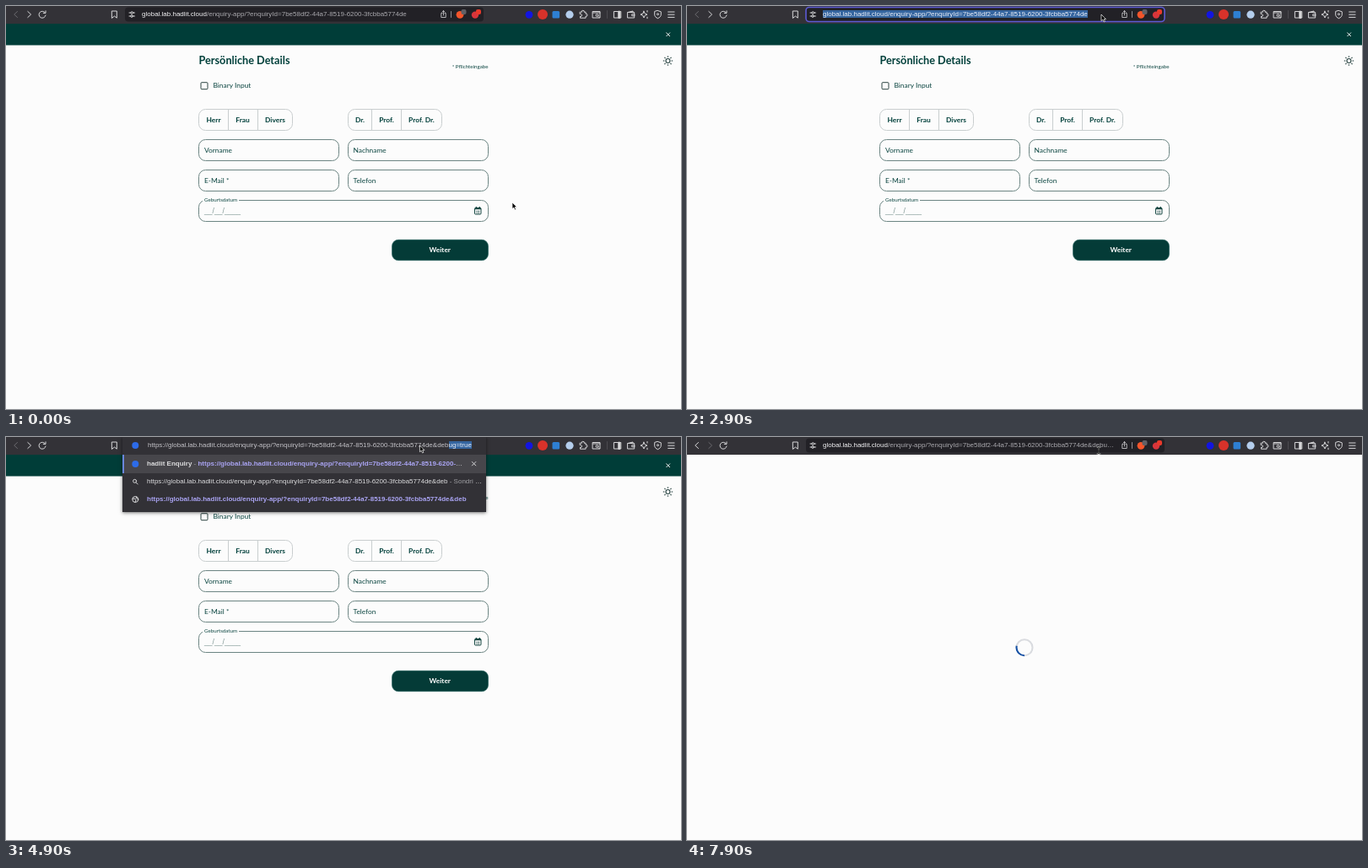
An HTML page for the animation above (8 s loop, 800 by 478 pixels).

```html
<!DOCTYPE html>
<html lang="de">
<head>
<meta charset="utf-8">
<title>Formular</title>
<style>
  html, body { margin: 0; width: 100%; height: 100%; overflow: hidden; background: #fcfcfc; }
  svg { position: absolute; left: 0; top: 0; }
  svg text { font-family: Lato, sans-serif; font-size: 8.4px; fill: #0b4540; }
  svg .bold { font-weight: 700; fill: #003f3a; }
  svg .small { font-size: 6.2px; }
  .line { fill: none; stroke-width: 1; }
  .icon { fill: none; stroke: #d6d6d8; stroke-width: 1; stroke-linecap: round; stroke-linejoin: round; }
  .row { position: absolute; height: 12px; line-height: 12px; font-family: "Liberation Sans", Arial, sans-serif;
         font-size: 8px; color: #a9a8ad; white-space: pre; overflow: hidden; text-overflow: ellipsis; }
  .row i { font-style: normal; color: #f2f2f4; }
  .row mark { background: #35659f; color: #e9eef8; }
  .row mark i { color: inherit; }
  #address { top: 4px; width: 345px; }
  #suggest { position: absolute; left: 138px; top: 0; width: 431px; height: 88.5px; background: #323136;
             box-shadow: 0 1px 4px #0008; }
  #suggest .row { left: 29px; color: #dcdcde; }
  #suggest .link { color: #aaa4f3; font-weight: 700; }
  #suggest .muted { color: #a0a0a4; }
  #active { position: absolute; top: 21px; width: 431px; height: 22px; background: #47464b; }
  #active::before { content: ""; position: absolute; width: 2px; height: 22px; background: #6a86dd; }
</style>
</head>
<body>
<svg width="800" height="478" viewBox="0 0 800 478">
  <rect width="800" height="478" fill="#fcfcfc"/>

  <g id="form">
    <rect y="20" width="800" height="26.5" fill="#003d38"/>
    <path d="M782.5 31.5l4.5 4.5m0-4.5l-4.5 4.5" stroke="#e6efee" stroke-width="1"/>
    <g stroke="#24403e" fill="none" stroke-width="1.1">
      <circle cx="784.5" cy="65" r="2.5"/>
      <g id="rays"></g>
    </g>
    <text class="bold" x="228.5" y="69.3" style="font-size:12.7px">Persönliche Details</text>
    <text class="small" x="571.5" y="74.2" text-anchor="end">* Pflichteingabe</text>
    <rect id="box" class="line" x="231" y="90.7" width="8" height="8" rx="1" stroke="#2d4442"/>
    <text x="245.5" y="97.3">Binary Input</text>

    <g class="line" stroke="#c9cecf">
      <rect x="228.5" y="122.5" width="111" height="25" rx="8"/>
      <rect x="405.5" y="122.5" width="111" height="25" rx="8"/>
      <path d="M263.5 122.5v25m35-25v25m135-25v25m35-25v25"/>
    </g>
    <g class="line" stroke="#6c8583">
      <rect x="228.5" y="158.5" width="166" height="25" rx="8"/>
      <rect x="405.5" y="158.5" width="166" height="25" rx="8"/>
      <rect x="228.5" y="194.5" width="166" height="25" rx="8"/>
      <rect x="405.5" y="194.5" width="166" height="25" rx="8"/>
      <rect x="228.5" y="230.5" width="343" height="25" rx="8"/>
    </g>
    <rect x="233" y="229" width="43" height="3" fill="#fcfcfc"/>
    <g class="choices" text-anchor="middle">
      <text class="bold" x="246" y="137.7">Herr</text>
      <text class="bold" x="280.5" y="137.7">Frau</text>
      <text class="bold" x="319" y="137.7">Divers</text>
      <text class="bold" x="419.5" y="137.7">Dr.</text>
      <text class="bold" x="451" y="137.7">Prof.</text>
      <text class="bold" x="492.5" y="137.7">Prof. Dr.</text>
    </g>
    <text x="235" y="173.6">Vorname</text>
    <text x="411.5" y="173.6">Nachname</text>
    <text x="235" y="209.6">E-Mail *</text>
    <text x="411.5" y="209.6">Telefon</text>
    <text class="small" x="235" y="232.4">Geburtsdatum</text>
    <text x="235" y="245.7" style="font:8.6px 'Liberation Sans',sans-serif;fill:#7d9593">__/__/____</text>
    <rect class="line" x="555.5" y="239.5" width="7.5" height="7.5" rx="1" stroke="#164742"/>
    <path d="M555.5 240.5h7.5M557.3 238v2m4-2v2" stroke="#164742" stroke-width="1.3"/>
    <path d="M557.3 243.3h4M557.3 245.2h4" stroke="#164742" stroke-dasharray="1 .5"/>
    <rect x="457.5" y="277.3" width="114" height="24.4" rx="7.5" fill="#043b37" stroke="#1c5d58" stroke-width=".6"/>
    <text class="bold" x="514.2" y="292.2" text-anchor="middle" style="fill:#fff">Weiter</text>
  </g>

  <g id="spinner" fill="none" stroke-width="2">
    <circle cx="400" cy="249.7" r="9.5" stroke="#d9dbdf"/>
    <circle id="arc" cx="400" cy="249.7" r="9.5" stroke="#1450a5" pathLength="360" stroke-dasharray="102 258"/>
  </g>

  <rect width="800" height="21" fill="#333237"/>
  <g class="icon">
    <path id="back" d="M13.5 6.5L9.7 10l3.8 3.5"/>
    <path id="forward" d="M25.8 6.5L29.6 10l-3.8 3.5"/>
    <path id="reload" d="M46.4 8a4 4 0 1 0 .6 3M47 5.8v2.6h-2.7"/>
    <path id="stop" d="M40.7 7.5l5 5m0-5l-5 5"/>
    <path d="M125.7 6h5.6v8.2l-2.8-2.2-2.8 2.2z"/>
  </g>
  <rect id="pill" x="141" y="1.5" width="425" height="17" rx="4" fill="#222126" stroke-width="1.6"/>
  <g class="icon">
    <path d="M146 8h2m3 0h1.5M146 12h1.5m3 0h2"/>
    <circle cx="149.3" cy="8" r="1.3"/><circle cx="149" cy="12" r="1.3"/>
    <path d="M517 8.5h-1.2v5h5.4v-5H520M518.5 11V5.7m-1.6 1.5l1.6-1.6 1.6 1.6" stroke-width=".8"/>
    <path d="M527.5 6.5v7" stroke="#8b8b90"/>
  </g>
  <circle cx="538" cy="10.3" r="4.4" fill="#f4552b"/>
  <circle cx="556" cy="10.6" r="4.2" fill="#d8353b"/>
  <rect x="539.5" y="4" width="6" height="6" rx="2" fill="#606066"/>
  <rect x="557" y="4" width="6" height="6" rx="2" fill="#e9392b"/>

  <circle cx="620" cy="10.3" r="4.4" fill="#1215e0"/>
  <circle cx="636" cy="10" r="6" fill="#d8322a"/>
  <rect x="647.5" y="6" width="8.6" height="8.6" rx="1.5" fill="#2e7fd2"/>
  <circle cx="668" cy="10.2" r="4.6" fill="#b4cdec"/>
  <g class="icon">
    <path d="M680.5 7.2h2a1.4 1.4 0 1 1 2.6 0h2v2.2a1.4 1.4 0 1 1 0 2.6v2.2h-6.6v-2a1.5 1.5 0 1 0 0-2.8z"/>
    <path d="M695.5 6.5h8.5v7.5h-8.5zM695.5 8h8.5M702 12.6l1 1"/><circle cx="700.5" cy="11" r="1.4"/>
    <path d="M712.5 5.5v9" stroke="#4b4a50"/>
    <path d="M720.8 6.5h8v7.5h-8z"/><path d="M726.7 7v6.5" stroke-width="3"/>
    <path d="M737 7.5l6-1.5v1.5m-6 0h7.7V14H737zm5.2 2.2h2.7v2h-2.7z"/>
    <path d="M756 6.2l1.2 2.7 2.8 1.2-2.8 1.2L756 14l-1.2-2.7-2.8-1.2 2.8-1.2zM760 5.5v1.6m0 6v1.6"/>
    <path d="M772.5 5.5l3.8 1.3v3.4c0 2-1.4 3.4-3.8 4.5-2.4-1.1-3.8-2.5-3.8-4.5V6.8z"/><circle cx="772.5" cy="9.7" r="1"/>
    <path d="M784.7 7h7.4m-7.4 3.2h7.4m-7.4 3.2h7.4"/>
  </g>
</svg>

<div id="suggest">
  <div id="active"></div>
  <svg width="431" height="89">
    <circle cx="15.3" cy="10" r="4" fill="#2d6be8"/>
    <circle cx="15.3" cy="32" r="4" fill="#2d6be8"/>
    <g class="icon" stroke-width=".9">
      <circle cx="14.6" cy="52.3" r="2"/><path d="M16.2 54l2 2"/>
      <circle cx="15.3" cy="74" r="3.5"/><path d="M12 73.2h3l1 1.5-1 2.7m1.5-6.6l-.3 1.6 2.3 1"/>
      <path d="M414.4 29.5l4.4 4.4m0-4.4l-4.4 4.4"/>
    </g>
  </svg>
  <div class="row" id="match" style="top:26px;width:376px"></div>
  <div class="row" id="search" style="top:47px;width:399px"></div>
  <div class="row link" id="visit" style="top:68px;width:399px"></div>
</div>
<div class="row" id="address"></div>

<svg id="cursor" width="24" height="24" viewBox="-8 -8 24 24">
  <path id="arrow" d="M0 0v7.6l1.8-1.5 1.3 2.8 1.3-.6-1.2-2.7h2.3z" fill="#000" stroke="#fff" stroke-width=".7"/>
  <g id="beam" fill="none">
    <path d="M-2.2-4.2Q0-4.2 0-3V3Q0 4.2-2.2 4.2M2.2-4.2Q0-4.2 0-3V3Q0 4.2 2.2 4.2M-1 .8h2" stroke="#ddd" stroke-width="1.8"/>
    <path d="M-2.2-4.2Q0-4.2 0-3V3Q0 4.2-2.2 4.2M2.2-4.2Q0-4.2 0-3V3Q0 4.2 2.2 4.2M-1 .8h2" stroke="#111" stroke-width=".9"/>
  </g>
</svg>

<script>
const LOOP = 8000, FOCUS = 2600, EDIT = 3400, TYPE = 4150, ENTER = 5900, LOADED = 6500;
const KEY_DELAY = 220, SPIN = 800;
const host = 'global.lab.hadlit.cloud';
const path = '/enquiry-app/?enquiryId=7be58df2-44a7-8519-6200-3fcbba5774de';
const suffix = '&debug=true';
const full = 'https://' + host + path;
const route = [[0, 600, 233], [50, 600, 233], [200, 262, 95], [1600, 263.5, 95], [2100, 263.5, 95],
  [2500, 491, 10], [6900, 490, 10], [7650, 490, 10], [7850, 488, 16], [LOOP, 488, 16]];

const $ = id => document.getElementById(id);
const show = (id, on) => { $(id).style.display = on ? '' : 'none'; };
const escape = text => text.replace(/&/g, '&amp;');
const setHtml = (id, html) => {
  const el = $(id);
  if (el.source !== html) el.innerHTML = el.source = html;
};

for (let i = 0; i < 8; i++) {
  $('rays').innerHTML += `<path d="M784.5 60.8v-1.5" transform="rotate(${i * 45} 784.5 65)"/>`;
}

function cursorAt(t) {
  const i = route.findIndex(point => point[0] > t);
  const [t0, x0, y0] = route[i - 1], [t1, x1, y1] = route[i];
  const k = (t - t0) / (t1 - t0), ease = k * k * (3 - 2 * k);
  return [x0 + (x1 - x0) * ease, y0 + (y1 - y0) * ease];
}

function addressHtml(t, typed) {
  const short = `<i>${host}</i>${path}`;
  if (t < FOCUS) return short;
  if (t < EDIT) return `<mark>${short}</mark>`;
  if (t < TYPE) return 'https://' + short;
  if (t < ENTER) return escape(full + typed) + `<mark>${suffix.slice(typed.length)}</mark>`;
  return short + escape(suffix);
}

function draw(t) {
  const typing = t >= TYPE && t < ENTER, left = t >= ENTER;
  const typed = suffix.slice(0, 1 + Math.floor(Math.max(0, t - TYPE) / KEY_DELAY));

  show('form', !left);
  show('spinner', left);
  $('arc').setAttribute('transform', `rotate(${(t - 6100) / SPIN * 360} 400 249.7)`);
  $('box').style.strokeWidth = t >= 200 && t < 2200 ? 1.4 : 1;

  $('back').style.stroke = left ? '' : '#69686d';
  $('forward').style.stroke = left ? '#69686d' : '';
  const loading = left && t < LOADED;
  show('stop', loading);
  show('reload', !loading);
  $('pill').setAttribute('stroke', t >= FOCUS && t < TYPE ? '#5d5bd5' : 'none');

  setHtml('address', addressHtml(t, typed));
  $('address').style.left = (typing ? 168 : 161) + 'px';
  $('address').style.width = (typing ? 398 : 345) + 'px';
  $('address').style.color = typing ? '#c3c2c7' : '';
  show('suggest', typing);
  if (typing) {
    const query = escape(full + typed);
    setHtml('match', `<b>hadlit Enquiry</b><span class="muted"> - </span><span class="link">${full}</span>`);
    setHtml('search', `${query}<span class="muted"> - Sondri Suche</span>`);
    setHtml('visit', query);
  }

  const beam = t >= EDIT && t < TYPE || left;
  const [x, y] = cursorAt(t);
  show('beam', beam);
  show('arrow', !beam);
  $('cursor').style.transform = `translate(${x - 8}px, ${y - 8}px)`;
}

function tick(now) {
  draw(now % LOOP);
  requestAnimationFrame(tick);
}
draw(0);
requestAnimationFrame(tick);
</script>
</body>
</html>
```
